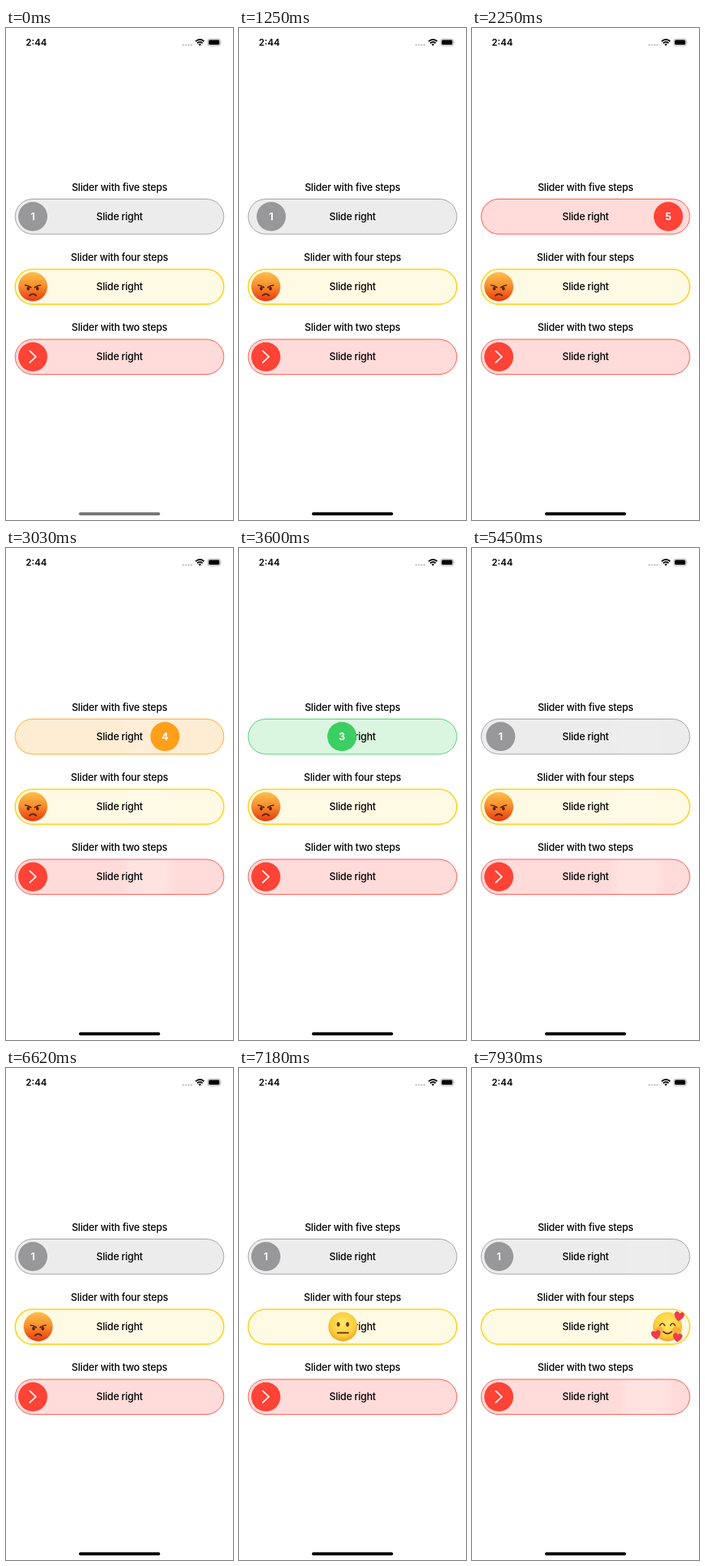
Recreate the animation shown at these times as an HTML page. Size 296 by 640 pixels, loop 8000 ms.

```html
<!DOCTYPE html>
<html lang="en">
<head>
<meta charset="utf-8">
<title>Step sliders</title>
<style>
  html, body { margin: 0; width: 100%; height: 100%; overflow: hidden; background: #fff; }
  svg { display: block; width: 296px; height: 640px; }
  text { font: 500 13px Inter, "Liberation Sans", sans-serif; letter-spacing: -.22px; text-anchor: middle; fill: #000; }
  .time { font-weight: 600; font-size: 12px; letter-spacing: 0; }
  .num { font-weight: 700; fill: #fff; letter-spacing: 0; }
  .ink { fill: none; stroke: #6b3410; stroke-linecap: round; stroke-linejoin: round; }
</style>
</head>
<body>
<svg viewBox="0 0 296 640">
  <defs>
    <linearGradient id="shine">
      <stop offset="0" stop-color="#fff" stop-opacity="0"/>
      <stop offset=".2" stop-color="#fff"/>
      <stop offset=".8" stop-color="#fff"/>
      <stop offset="1" stop-color="#fff" stop-opacity="0"/>
    </linearGradient>
    <linearGradient id="rage" x2="0" y2="1">
      <stop offset="0" stop-color="#fcc04a"/>
      <stop offset=".45" stop-color="#f8912f"/>
      <stop offset="1" stop-color="#e8380f"/>
    </linearGradient>
    <radialGradient id="sun" cy=".4" r=".62">
      <stop offset="0" stop-color="#ffe96b"/>
      <stop offset=".65" stop-color="#fdcf3d"/>
      <stop offset="1" stop-color="#f0a020"/>
    </radialGradient>
    <path id="heart" d="M0 5.5C-7 1-6.5-5-3-5Q-.7-5 0-2.6Q.7-5 3-5C6.5-5 7 1 0 5.5Z" fill="#ef3b4f" stroke="#d92b45" stroke-width=".5"/>
    <clipPath id="pill"><rect x="12" y="0" width="272" height="46" rx="23"/></clipPath>
  </defs>

  <text class="time" x="39.5" y="23">2:44</text>
  <g fill="#c4c4c6">
    <circle cx="231" cy="22" r="1.2"/><circle cx="234.6" cy="22" r="1.2"/>
    <circle cx="238.2" cy="22" r="1.2"/><circle cx="241.6" cy="22" r="1.2"/>
  </g>
  <g fill="none" stroke="#000" stroke-width="1.9">
    <path d="M247.2 17.4Q252.8 12.4 258.4 17.4M249.3 19.7Q252.8 16.6 256.3 19.7"/>
    <path d="M251 21.2Q252.8 19.8 254.6 21.2L252.8 23.2Z" fill="#000" stroke="none"/>
  </g>
  <rect x="263" y="14.3" width="16.6" height="8.8" rx="2.6" fill="none" stroke="#a5a5a7" stroke-width=".8"/>
  <rect x="264.3" y="15.6" width="14" height="6.2" rx="1.5"/>
  <path d="M280.7 17.2q1.4 1.5 0 3z" fill="#a5a5a7"/>

  <g id="sliders"></g>
  <rect id="home" x="95" y="630" width="106" height="4" rx="2"/>
</svg>
<script>
const LOOP = 8000, MIN = 35, MAX = 261;
const COLORS = ['#98989a', '#2f86f6', '#3bce62', '#ff9f1a', '#ff4336'];

// [first, last, count]: moments at which the screen refreshes
const TICKS = [[0, 0, 1], [120, 520, 5], [670, 780, 2], [1250, 1380, 2], [1520, 2000, 5],
  [2250, 2250, 1], [2450, 3150, 7], [3270, 4060, 8], [4170, 4890, 8], [5010, 5770, 8],
  [5880, 5880, 1], [6620, 7410, 8], [7510, 7930, 5]];

// [time, thumb centre]
const NUMBER_DRAG = [[1249, 35], [1250, 42], [1380, 66], [1520, 100], [1760, 172], [2000, 248],
  [2250, 256], [2450, 252], [2800, 222], [3150, 178], [3600, 121], [4060, 98], [4890, 70],
  [5100, 58], [5450, 37], [5880, 35]];
const FACE_DRAG = [[6500, 35], [6620, 42], [7180, 158], [7410, 196], [7930, 255]];

const ink = (d, w = 1.6) => `<path class="ink" d="${d}" stroke-width="${w}"/>`;
const ball = fill => `<circle r="19" fill="url(#${fill})"/>`;
const dots = (y, rx, ry, color) => [-6, 6].map(x =>
  `<ellipse cx="${x}" cy="${y}" rx="${rx}" ry="${ry}" fill="${color}"/>`).join('');
const heart = (x, y, turn, size) =>
  `<use href="#heart" transform="translate(${x} ${y}) rotate(${turn}) scale(${size})"/>`;

const FACES = [
  ball('rage') + dots(2.6, 1.9, 2.3, '#5c210a') +
    `<g style="filter:brightness(.8)">${ink('M-10-2Q-6-1.5-2.5 1M10-2Q6-1.5 2.5 1', 1.7)}${ink('M-4.3 11.5Q0 7.6 4.3 11.5', 1.9)}</g>`,
  ball('sun') + dots(-3, 2, 2.9, '#6b3410') + ink('M-7 8H7', 1.8),
  ball('sun') + ink('M-8.8-2.2Q-6.2-10-3.8-2.2M3.8-2.2Q6.2-10 8.8-2.2', 1.9) +
    '<path d="M-12 2.2Q0 4 12 2.2Q11.5 13 0 13Q-11.5 13-12 2.2Z" fill="#6b3410"/>' +
    '<path d="M-11 3.2Q0 5 11 3.2Q10.5 8 9 8.6Q0 10.2-9 8.6Q-10.5 8-11 3.2Z" fill="#fff"/>' +
    '<path d="M-6 11Q0 9.4 6 11Q3 12.4 0 12.3Q-3 12.4-6 11Z" fill="#d9593c"/>',
  ball('sun') + '<g opacity=".55"><ellipse cx="-11" cy="4" rx="5" ry="4" fill="#f58a45"/><ellipse cx="11" cy="4" rx="5" ry="4" fill="#f58a45"/></g>' +
    ink('M-10-1.5Q-6.8-7-3.6-1.5M3.6-1.5Q6.8-7 10-1.5') + ink('M-5.5 6.5Q0 11.5 5.5 6.5', 1.8) +
    heart(15, -13.5, 12, 1.1) + heart(-15, 10.5, -10, 1.05) + heart(13, 14, 10, 1.05)
];

const chevron = '<circle r="19" fill="#ff4336"/>' +
  '<path d="M-4-7.5L4 0L-4 7.5" fill="none" stroke="#fff" stroke-width="1.8" stroke-linecap="round" stroke-linejoin="round"/>';
const number = '<circle r="19"/><text class="num" y="4.8">1</text>';
const faces = FACES.map(f => `<g class="face">${f}</g>`).join('');

const slider = (id, y, title, color, tint, line, glow, thumb) => `
  <text x="148" y="${y - 10.3}">${title}</text>
  <g id="${id}" transform="translate(0 ${y})">
    <rect class="track" x="12" y=".3" width="272" height="45.6" rx="22.8" fill="${color}" fill-opacity="${tint}"/>
    <g clip-path="url(#pill)"><rect class="glow" width="74" height="46" fill="url(#shine)" opacity="${glow}"/></g>
    <rect class="edge" x="12" y=".3" width="272" height="45.6" rx="22.8" fill="none" stroke="${color}" stroke-width="${line}"/>
    <text x="148" y="27.8">Slide right</text>
    <g class="thumb" transform="translate(${MIN} 23)">${thumb}</g>
  </g>`;

const $ = q => document.querySelector(q);
$('#sliders').innerHTML =
  slider('five', 222.2, 'Slider with five steps', COLORS[0], .19, .9, .08, number) +
  slider('four', 313.5, 'Slider with four steps', '#ffd21a', .12, 1.6, .15, faces) +
  slider('two', 404.7, 'Slider with two steps', COLORS[4], .19, .9, .22, chevron);

const five = { track: $('#five .track'), edge: $('#five .edge'), thumb: $('#five .thumb'),
  disc: $('#five circle'), num: $('#five .num') };
const faceThumb = $('#four .thumb');
const faceList = document.querySelectorAll('.face');
const glows = document.querySelectorAll('.glow');
const home = $('#home');

function snap(t) {
  const [a, b, n] = TICKS.filter(r => r[0] <= t).pop();
  if (t >= b) return b;
  const gap = (b - a) / (n - 1);
  return a + Math.floor((t - a) / gap) * gap;
}

function at(keys, t) {
  const i = keys.findIndex(k => k[0] > t);
  if (i === 0) return keys[0][1];
  if (i < 0) return keys[keys.length - 1][1];
  const [t0, x0] = keys[i - 1], [t1, x1] = keys[i];
  return x0 + (x1 - x0) * (t - t0) / (t1 - t0);
}

const step = (x, count) => Math.round((x - MIN) / (MAX - MIN) * (count - 1));
const place = (el, x) => el.setAttribute('transform', `translate(${x.toFixed(2)} 23)`);

function draw(time) {
  const t = snap(time);

  const x = at(NUMBER_DRAG, t), s = step(x, 5);
  place(five.thumb, x);
  five.track.setAttribute('fill', COLORS[s]);
  five.edge.setAttribute('stroke', COLORS[s]);
  five.disc.setAttribute('fill', COLORS[s]);
  five.num.textContent = s + 1;

  const fx = at(FACE_DRAG, t), mood = step(fx, 4);
  place(faceThumb, fx);
  faceList.forEach((f, i) => f.style.display = i === mood ? '' : 'none');

  const u = (t - 120 + 2457) % 2457;
  glows.forEach(g => {
    g.style.display = u < 720 ? '' : 'none';
    g.setAttribute('x', 2 + u * .43);
  });

  home.setAttribute('fill', t < 1250 ? '#777' : '#000');
}

const start = performance.now();
function tick() {
  draw((performance.now() - start) % LOOP);
  requestAnimationFrame(tick);
}
tick();
</script>
</body>
</html>
```
